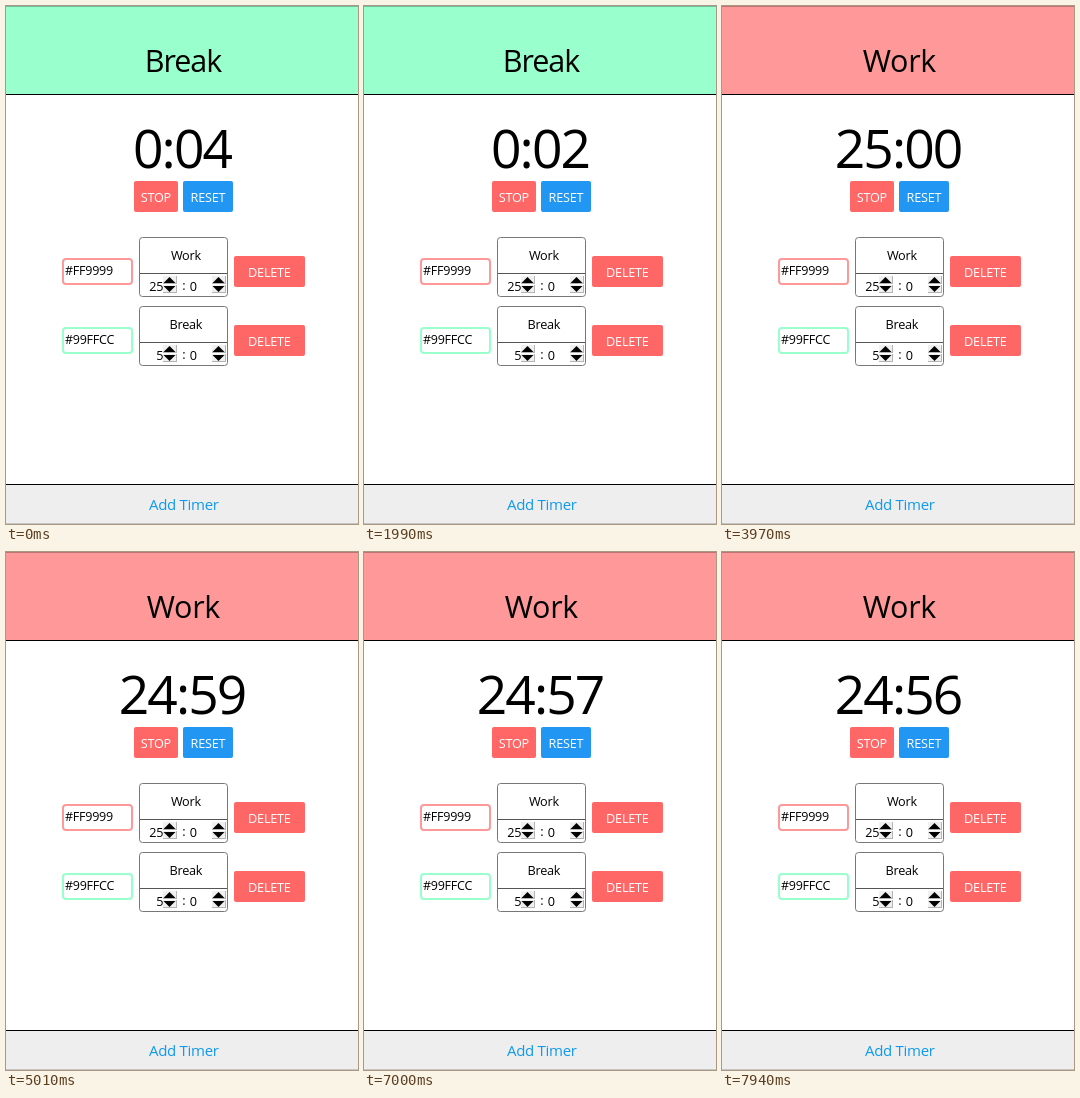
These frames come from a looping animation (352 px wide and 518 px high, 8 s). An HTML page with a canvas:

```html
<!DOCTYPE html>
<html lang="en">
<head>
<meta charset="utf-8">
<title>Interval timer</title>
<style>
  html, body { margin: 0; width: 100%; height: 100%; overflow: hidden; background: #fff; }
  canvas { display: block; width: 352px; height: 518px; }
</style>
</head>
<body>
<canvas id="stage"></canvas>
<script>
const W = 352, H = 518, LOOP = 8000;
const RED = '#ff9999', GREEN = '#99ffcc', BUTTON = '#ff6666', BLUE = '#2196f3';
const FONT = '"Open Sans", "Noto Sans", sans-serif';

// Moments at which the clock ticks.
const TICKS = [1010, 1990, 3030, 3970, 5010, 5960, 7000, 7940];
const BREAK_LEFT = 4, WORK_LENGTH = 25 * 60;

const canvas = document.getElementById('stage');
const ctx = canvas.getContext('2d');
const ratio = window.devicePixelRatio || 1;
canvas.width = W * ratio;
canvas.height = H * ratio;
ctx.scale(ratio, ratio);

function rect(x, y, w, h, fill) {
  ctx.fillStyle = fill;
  ctx.fillRect(x, y, w, h);
}

function box(x, y, w, h, radius, fill) {
  ctx.fillStyle = fill;
  ctx.beginPath();
  ctx.roundRect(x, y, w, h, radius);
  ctx.fill();
}

function frame(x, y, w, h, radius, line, color) {
  ctx.strokeStyle = color;
  ctx.lineWidth = line;
  ctx.beginPath();
  ctx.roundRect(x + line / 2, y + line / 2, w - line, h - line, radius);
  ctx.stroke();
}

// spacing is in em; anchor is 0 for left, 0.5 for centre, 1 for right
function text(str, x, y, size, { color = '#000', spacing = -0.02, anchor = 0.5 } = {}) {
  ctx.font = `${size}px ${FONT}`;
  ctx.letterSpacing = `${spacing * size}px`;
  ctx.fillStyle = color;
  const width = ctx.measureText(str).width - spacing * size;
  ctx.fillText(str, x - width * anchor, y);
}

function button(label, x, y, w, color) {
  box(x, y, w, 31, 2, color);
  text(label, x + w / 2, y + 21, 12.7, { color: '#fff' });
}

function triangle(x, baseY, tipY) {
  ctx.fillStyle = '#000';
  ctx.beginPath();
  ctx.moveTo(x - 6, baseY);
  ctx.lineTo(x + 6, baseY);
  ctx.lineTo(x, tipY);
  ctx.fill();
}

function spinner(x, y) {
  for (const top of [y, y + 9]) {
    rect(x, top, 14, 8, '#b4b4b4');
    rect(x, top, 13, 7, '#f0f0f0');
  }
  triangle(x + 6.5, y + 7, y + 1);
  triangle(x + 6.5, y + 10, y + 16);
}

function timerRow(y, name, hex, color, minutes) {
  frame(56, y + 21, 71, 27, 3, 2, color);
  text(hex, 59, y + 38, 12.5, { anchor: 0 });

  frame(133, y, 89, 60, 3, 1, '#777');
  rect(134, y + 36, 87, 1, '#555');
  text(name, 180, y + 23, 12.7);
  text(minutes, 157.5, y + 54, 12.7, { anchor: 1 });
  spinner(157, y + 39);
  text(':', 178, y + 53, 12.7);
  text('0', 187.5, y + 54, 12.7);
  spinner(206, y + 39);

  button('DELETE', 228, y + 19, 71, BUTTON);
}

function clock(seconds) {
  return `${Math.floor(seconds / 60)}:${String(seconds % 60).padStart(2, '0')}`;
}

function draw(t) {
  const ticks = TICKS.filter(at => t >= at).length;
  const onBreak = ticks < BREAK_LEFT;
  const left = onBreak ? BREAK_LEFT - ticks : WORK_LENGTH - (ticks - BREAK_LEFT);

  rect(0, 0, W, H, '#fff');
  rect(0, 0, W, 88, onBreak ? GREEN : RED);
  rect(0, 0, W, 1, 'rgba(0, 0, 0, 0.25)');
  rect(0, 88, W, 1, '#000');
  text(onBreak ? 'Break' : 'Work', 177.5, 66, 30.5, { spacing: onBreak ? -0.035 : -0.01 });

  text(clock(left), 177, 162, 53.33, { spacing: -0.035 });
  button('STOP', 128, 175, 44, BUTTON);
  button('RESET', 177, 175, 50, BLUE);

  timerRow(231, 'Work', '#FF9999', RED, '25');
  timerRow(300, 'Break', '#99FFCC', GREEN, '5');

  rect(0, 478, W, 1, '#000');
  rect(0, 479, W, 39, '#eee');
  rect(0, 517, W, 1, '#c4c4c4');
  text('Add Timer', 178, 504, 15, { color: '#0f9aee' });
}

const start = performance.now();
function tick() {
  draw((performance.now() - start) % LOOP);
  requestAnimationFrame(tick);
}
tick();
</script>
</body>
</html>
```
